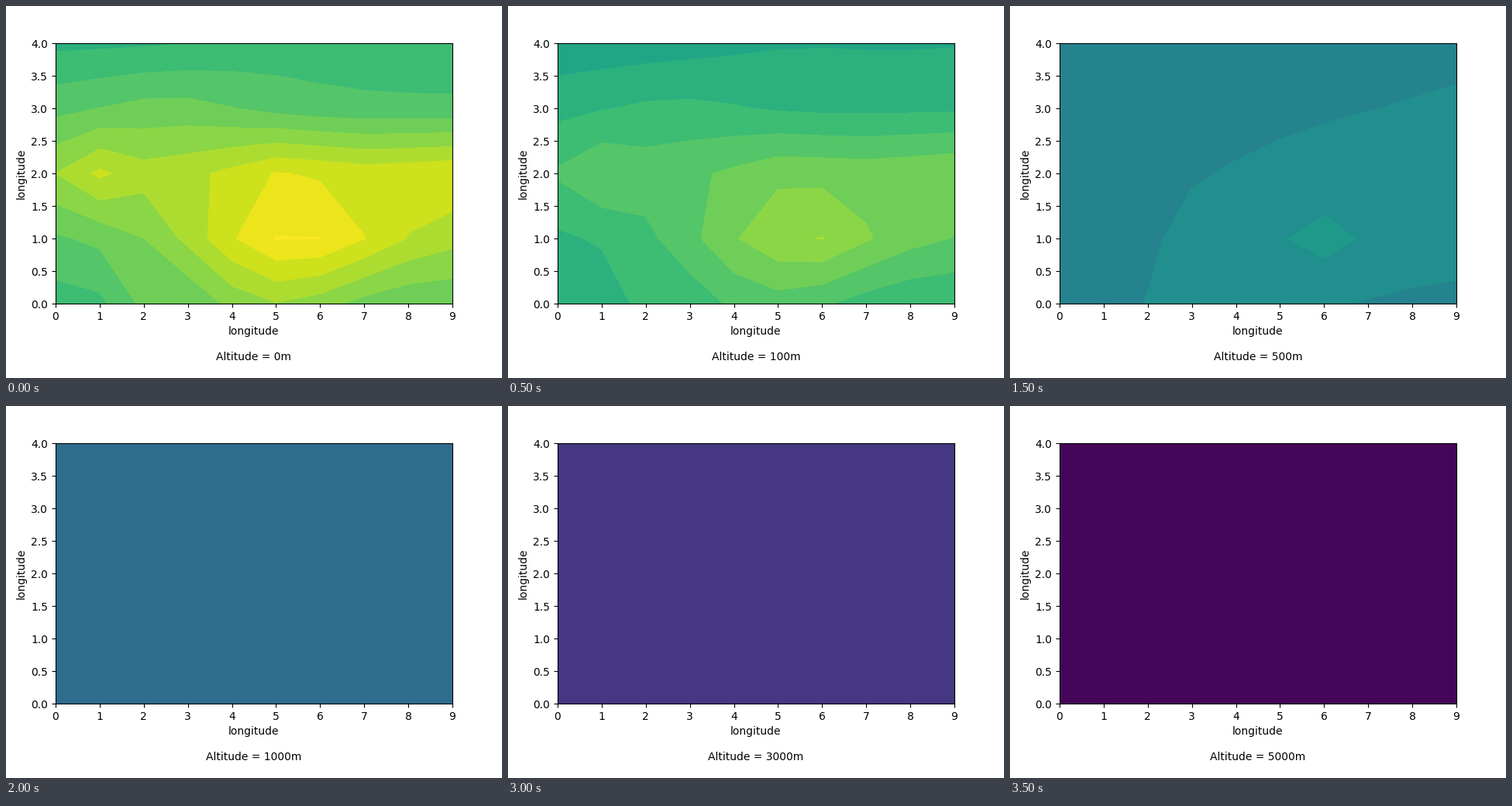
Write a matplotlib script that moves like this. It is 640 px wide and 480 px high and loops after 4 s.

```python
import numpy as np
import matplotlib.pyplot as plt
from matplotlib.animation import FuncAnimation

X = np.arange(10)


def row(base, slope, height=0, centre=5, width=1):
    """One grid row: a straight trend with a bell-shaped rise on it."""
    return base + slope * X + height * np.exp(-((X - centre) / width) ** 2)


def field(rows, spots):
    """Stack rows from y = 0 upwards and add isolated warm spots (x, y, rise)."""
    z = np.array([row(*r) for r in rows])
    for x, y, rise in spots:
        z[y, x] += rise
    return z


def mix(a, b, t):
    return a + (b - a) * t


# Heights are counted in colour bands.
ground = field(
    [(14.5, 0.18, 2.55, 4.9, 2.0),
     (15.8, 0.23, 4.15, 5.3, 2.5),
     (18.0, 0.215, 1.0, 5.1, 1.2),
     (15.42, -0.02, 1.05, 2.6, 2.2),
     (13.75, 0.04, 0.42, 5.2, 2.0)],
    [(2, 0, 1.1), (1, 2, 1.0)])
upper = field(
    [(10.5, 0.04, 1.36, 4.0, 3.4),
     (10.72, 0.165, 1.35, 5.3, 2.6),
     (10.85, 0.185),
     (10.7, 0.11),
     (10.1, 0.12)],
    [(6, 1, 0.6)])

CMAP = plt.get_cmap("viridis")
LEVELS = np.arange(7, 23)
BAND_COLORS = CMAP(np.minimum(0.02 + 0.0475 * LEVELS[:-1], 1.0))

# Each altitude in metres has a field, or one colormap position if it is even.
LAYERS = [
    (0, ground),
    (100, mix(ground, upper, 0.4)),
    (250, upper),
    (500, mix(upper, 7.0, 1 / 3)),
    (1000, 0.354),
    (2000, 0.222),
    (3000, 0.16),
    (5000, 0.012),
]

fig = plt.figure(figsize=(6.4, 4.8), dpi=100)
ax = fig.add_axes([0.1, 0.2, 0.8, 0.7])


def draw(i):
    altitude, layer = LAYERS[i]
    ax.clear()
    if np.ndim(layer):
        ax.contourf(layer, levels=LEVELS, colors=BAND_COLORS)
    else:
        ax.set_facecolor(CMAP(layer))
    ax.set(xlim=(0, 9), ylim=(0, 4), xticks=X, yticks=np.arange(0, 4.1, 0.5))
    ax.set_xlabel(f"longitude\n\nAltitude = {altitude}m", x=0.4998)
    ax.set_ylabel("longitude")
    return ax.get_children()


anim = FuncAnimation(fig, draw, frames=len(LAYERS), init_func=lambda: [],
                     interval=500, repeat=True, repeat_delay=0)
plt.show()
```
